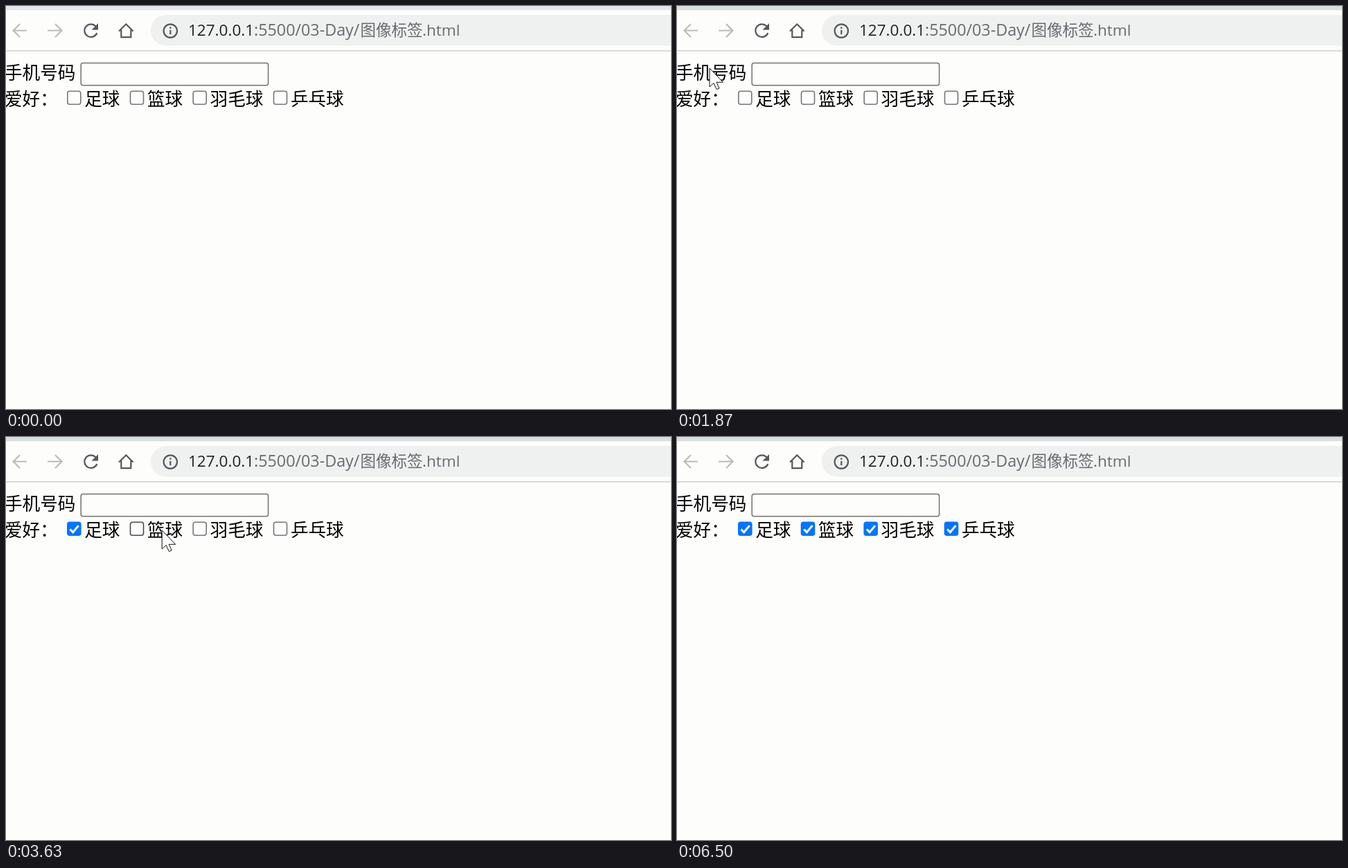
Write an HTML page that moves like this. It is 960x583 px and loops after 7.26 s.

```html
<!DOCTYPE html>
<html lang="zh-CN">
<head>
<meta charset="utf-8">
<title>表单标签</title>
<style>
  html, body { margin: 0; width: 100%; height: 100%; overflow: hidden; background: #fdfdfc; }
  svg { display: block; width: 960px; height: 583px; }
  text { font: 25.6px "Noto Sans CJK SC", "Noto Sans CJK", sans-serif; white-space: pre; }
  .url text { font: 22.5px "Open Sans", "Noto Sans CJK SC", "Noto Sans CJK", sans-serif; fill: #676b6f; }
  .url .host { fill: #202124; }
  .url .path { font-size: 23.3px; }
  .icon { fill: none; stroke: #55585c; stroke-width: 2.2; }
  .off { stroke: #bbb; }
</style>
</head>
<body>
<svg viewBox="0 0 960 583">
  <rect id="strip" width="960" height="6"/>
  <rect y="64" width="960" height="1.6" fill="#d3d3d5"/>
  <rect x="209" y="13" width="800" height="44.5" rx="22" fill="#eff1f0"/>

  <path class="icon off" d="M30 35.5H11M20 26l-9.5 9.5L20 45"/>
  <path class="icon off" d="M60 35.5h20M71 26l9.5 9.5L71 45"/>
  <path class="icon" d="M129.5 29.3A9.3 9.3 0 1 0 131.3 39"/>
  <path d="M133 25v9.5h-9.5z" fill="#55585c"/>
  <path class="icon" d="M163 36.5l10.3-10.2 10.3 10.2M166.3 34.5v10.7h14V34.5"/>
  <circle class="icon" cx="237.3" cy="36" r="9.7"/>
  <path class="icon" d="M237.3 34.7v6.3M237.3 30.3v2.4"/>

  <g class="url">
    <text class="host" x="263" y="43">127.0.0.1</text>
    <text class="path" x="358" y="43">:5500/03-Day/</text>
    <text x="511.5" y="43">图像标签</text>
    <text x="601" y="43">.html</text>
  </g>

  <text x="-2" y="106">手机号码</text>
  <rect id="field" x="108.2" y="82.4" width="270.4" height="32.4" rx="3" fill="none"/>
  <path id="caret" d="M113 87v23" stroke="#000" stroke-width="1.6"/>
  <text x="-2" y="143.5">爱好：</text>
  <g id="options"></g>
  <path id="cursor" d="M0 0V27L6 21.5 10.2 30.6 14 29 10 20.3H19.5Z" fill="#fff" stroke="#111"/>
</svg>
<script>
const LOOP = 7260, FOCUS = 2000, FONT = 25.6;
const CLICK_DELAY = 130, REST = 300;   // after the pointer reaches a label
const $ = id => document.getElementById(id);
const set = (el, attrs) => {
  for (const k in attrs) el.setAttribute(k, attrs[k]);
  return el;
};
const add = (tag, attrs) =>
  $('options').appendChild(set(document.createElementNS('http://www.w3.org/2000/svg', tag), attrs));
const show = (el, on) => set(el, { visibility: on ? 'visible' : 'hidden' });

// Each label with the time the pointer reaches it; boxes follow in inline flow
let left = 88;
const options = Object.entries({ 足球: 2930, 篮球: 3630, 羽毛球: 4700, 乒乓球: 5970 }).map(([label, arrive]) => {
  const x = left, width = label.length * FONT;
  left += width + 39.5;
  const box = add('rect', { x: x + .8, y: 123.3, width: 19, height: 19, rx: 3, 'stroke-width': 1.6 });
  const tick = add('path', { d: `M${x + 4.5} 133.5l4.2 4.2 8-9.6`, fill: 'none', stroke: '#fff', 'stroke-width': 3 });
  add('text', { x: x + 25.2, y: 143.5 }).textContent = label;
  return { x, width, arrive, box, tick, end: x + 25 + width, click: arrive + CLICK_DELAY };
});

// Pointer stops: time, x, y
const stops = [
  [670, 216, 575], [770, 176, 241], [1400, 65, 112], [1870, 47, 90], [2130, 47, 90], [2480, 335, 125],
  ...options.flatMap(({ x, width, arrive }) =>
    [arrive, arrive + REST].map(t => [t, x + 26 + width * .4, 135])),
  [6490, 690, 580]
];

// Eased moves that sag a little between stops
function pointer(t) {
  const i = stops.findIndex(s => s[0] > t);
  if (i < 1) return null;
  const [t0, x0, y0] = stops[i - 1], [t1, x1, y1] = stops[i];
  const k = (t - t0) / (t1 - t0), ease = k * k * (3 - 2 * k);
  const sag = Math.min(36, Math.abs(x1 - x0) * .4) * Math.sin(Math.PI * k) ** 2;
  return [x0 + (x1 - x0) * ease, y0 + (y1 - y0) * ease + sag];
}

function draw(t) {
  const at = pointer(t);
  show($('cursor'), at);
  if (at) set($('cursor'), { transform: `translate(${at})` });
  set($('strip'), { fill: t < 1400 ? '#e3e6ea' : '#d9dee1' });

  const focused = t >= FOCUS && t < options[0].click;
  set($('field'), { stroke: focused ? '#000' : '#72726f', 'stroke-width': focused ? 3 : 1.5 });
  show($('caret'), focused && (t - FOCUS) % 1000 < 500);

  for (const o of options) {
    const on = t >= o.click;
    const hover = at && at[0] >= o.x && at[0] <= o.end && at[1] > 118 && at[1] < 152;
    const blue = hover ? '#005cc8' : '#0075ff';
    set(o.box, { fill: on ? blue : '#fefefe', stroke: on ? blue : hover ? '#4a4a4a' : '#767676' });
    show(o.tick, on);
  }
}

const start = performance.now();
(function frame() {
  draw((performance.now() - start) % LOOP);
  requestAnimationFrame(frame);
})();
</script>
</body>
</html>
```
